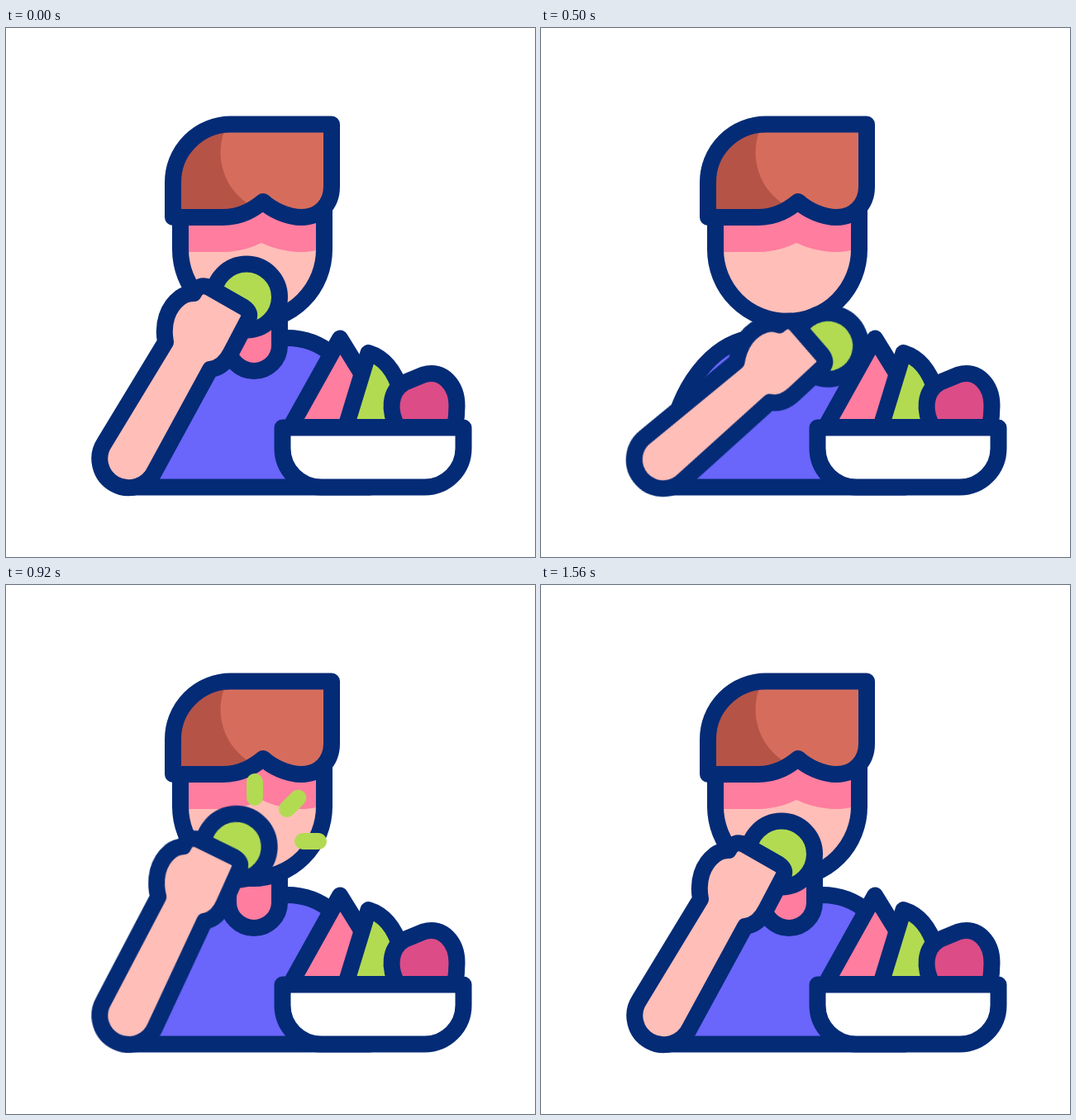
An HTML page that plays this animation: 640x640 px, repeating every 1.72 s.

```html
<!DOCTYPE html>
<html lang="en">
<head>
<meta charset="utf-8">
<title>Eating fruit</title>
<style>
  html, body { margin: 0; width: 100%; height: 100%; overflow: hidden; background: #fff; }
  svg { display: block; width: 100vw; height: 100vh; }

  .line { stroke: #042b76; stroke-width: 20; stroke-linejoin: round; }
  .skin { fill: #ffbeb8; }
  .pink { fill: #ff7d9f; }
  .green { fill: #b2db52; }
  .shirt { fill: #6a65fb; }
  .hair { fill: #d66d5c; }
  .hair-shade { fill: #b55347; }
  .berry { fill: #dc4c87; }
  .bowl { fill: #fff; }
  .crumbs line { stroke: #b2db52; stroke-width: 20; stroke-linecap: round; }

  .arm, .head, .crumbs line {
    animation: 1720ms cubic-bezier(.37, 0, .63, 1) infinite;
  }
  .arm { animation-name: reach; transform-origin: 145px 520px; }
  .head { animation-name: nod; }
  .crumbs line { animation-name: burst; transform-origin: 10px 0; }

  @keyframes reach {
    0% { transform: rotate(0deg); }
    22.09% { transform: rotate(24.5deg); }
    47.67% { transform: rotate(-5.3deg); }
    62.79%, 100% { transform: rotate(0deg); }
  }
  @keyframes nod {
    0%, 65.12% { transform: translateY(0); }
    77.91% { transform: translateY(-13px); }
    90.7%, 100% { transform: translateY(0); }
  }
  @keyframes burst {
    0% { transform: translateX(0) scale(0); animation-timing-function: step-end; }
    50% { transform: translateX(0) scale(1); animation-timing-function: cubic-bezier(.39, .575, .565, 1); }
    57.56% { transform: translateX(76px) scale(1); animation-timing-function: linear; }
    59.3% { transform: translateX(82px) scale(0); animation-timing-function: step-end; }
    59.88% { transform: translateX(0) scale(1); animation-timing-function: cubic-bezier(.39, .575, .565, 1); }
    69.77% { transform: translateX(87px) scale(1); animation-timing-function: linear; }
    72.09%, 100% { transform: translateX(100px) scale(0); }
  }
</style>
</head>
<body>
<svg viewBox="0 0 640 640">
  <path class="shirt line" d="M150 555.5 L158 490 C172 425 215 375 262 375 H340 C375 375 420 395 440 480 V555.5 Z"/>
  <path class="pink line" d="M269 335 V384 A31 31 0 0 0 331 384 V335"/>

  <g class="head">
    <path class="skin" d="M211 190 V268 A87 87 0 0 0 385 268 V190 Z"/>
    <path class="pink" d="M211 190 V271 H262 C285 271 300 264 309 260 C318 264 335 271 357 271 C368 271 376 269 385 266 V190 Z"/>
    <path class="line" fill="none" d="M211 215 V268 A87 87 0 0 0 385 268 V215"/>
    <path class="hair" id="hair" d="M202 229 V187 A70 70 0 0 1 272 116.5 H394 V192 C394 214 378 229 358 229 C340 229 322 220 311 210 C300 219 285 229 262 229 Z"/>
    <path class="hair-shade" d="M266 120 A75 75 0 0 0 298 216 Q285 229 262 229 H202 V187 A70 70 0 0 1 266 117 Z"/>
    <use href="#hair" class="line" style="fill-opacity: 0"/>
  </g>

  <g class="crumbs" transform="translate(301 310)">
    <g transform="rotate(-90)"><line x1="0" x2="19"/></g>
    <g transform="rotate(-45)"><line x1="2" x2="21"/></g>
    <g><line x1="5" x2="24"/></g>
  </g>

  <path class="pink line" d="M344 483 L404 375.5 L450 450 V483 Z"/>
  <path class="green line" d="M411 483 L438.5 393 C458 399 470 414 478 440 V483 Z"/>
  <path class="berry line" d="M474 483 C463 465 463 440 482 429 L505 419.5 C528 412 545.5 432 545.5 457 Q545.5 470 543 483 Z"/>
  <path class="bowl line" d="M334.5 483.5 H553.5 V508.5 A47 47 0 0 1 506.5 555.5 H381.5 A47 47 0 0 1 334.5 508.5 Z"/>

  <g class="arm">
    <circle class="green line" cx="291" cy="325.5" r="40"/>
    <path class="skin line" d="M119 502 L193 380 C189 358 195 338 211 326 Q218 321 227 321 C231 313 238 310 246 314 L288 338 Q297 344 293 353 L272 393 Q263 411 247 413 L180 536 A35 35 0 1 1 119 502 Z"/>
  </g>
</svg>
</body>
</html>
```
